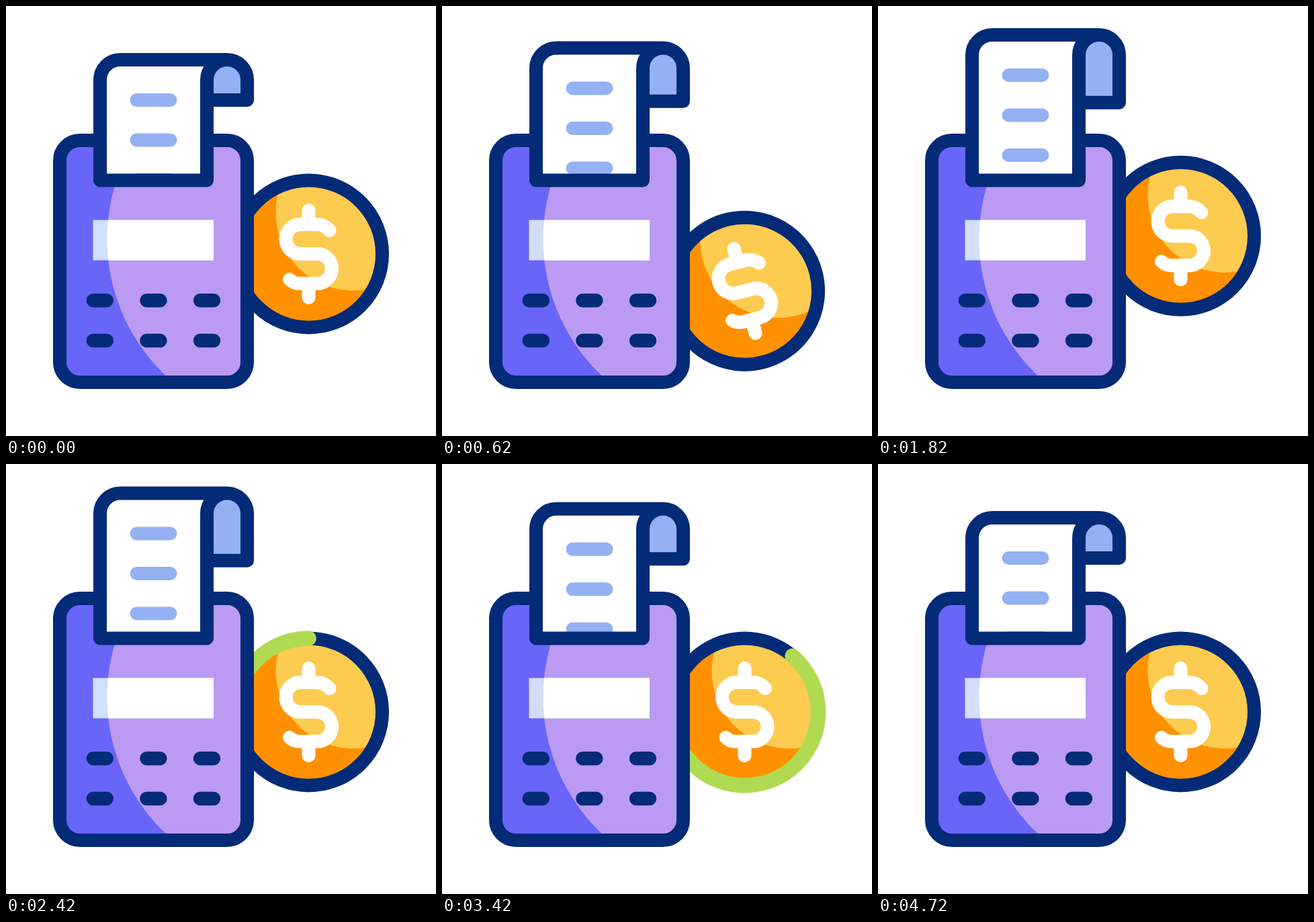
Animation of 640 by 640 pixels, one loop 4.82 s. Source, as an HTML page:

```html
<!DOCTYPE html>
<html lang="en">
<head>
<meta charset="utf-8">
<title>Payment terminal</title>
<style>
  html, body { margin: 0; width: 100%; height: 100%; overflow: hidden; background: #fff; }
  svg { display: block; width: 100vw; height: 100vh; }
  .line { fill: none; stroke-width: 20; stroke-linecap: round; stroke-linejoin: round; }
  .navy { stroke: #032b77; }
  .blue { stroke: #94b1f3; }
  .white { stroke: #fff; }
</style>
</head>
<body>
<svg viewBox="0 0 640 640">
  <defs>
    <clipPath id="lit"><circle cx="430.5" cy="347" r="280"/></clipPath>
    <clipPath id="disc"><circle r="109.5"/></clipPath>
  </defs>

  <g id="coin">
    <circle r="109.5" fill="#ff9100"/>
    <circle cx="66.5" cy="-61" r="115.5" fill="#fdcb50" clip-path="url(#disc)"/>
    <circle class="line navy" r="109.5"/>
    <path id="sweep" class="line" stroke="#b0da52" style="stroke-width:22.5"/>
    <path class="line white" d="M0-65V-44M0 44V65"/>
    <path id="sign" class="line white"
      d="M31-35c-5-6-11-9-19-9H-12a22 22 0 0 0 0 44H12.5a22 22 0 0 1 0 44H-13.5c-6 0-11-2-15-6"/>
  </g>

  <rect x="80" y="200" width="279" height="360" rx="30" fill="#6965f9"/>
  <rect x="80" y="200" width="279" height="360" rx="30" fill="#bb9af3" clip-path="url(#lit)"/>
  <rect x="129.5" y="318.5" width="179.5" height="60" fill="#d2defd"/>
  <rect x="129.5" y="318.5" width="179.5" height="60" fill="#fff" clip-path="url(#lit)"/>
  <rect class="line navy" x="80" y="200" width="279" height="360" rx="30"/>
  <path id="keys" class="line navy" style="stroke-width:20.5"/>
  <path id="flash" class="line" stroke="#fdcb50" style="stroke-width:23"/>

  <path id="sheet" fill="#fff"/>
  <path id="flap" fill="#94b1f3"/>
  <path id="rows" class="line blue" d="M194.5 140h50M194.5 199.5h50M194.5 259h50"/>
  <path id="outline" class="line navy"/>
</svg>
<script>
const LOOP = 4820;
const el = id => document.getElementById(id);
const set = (id, name, value) => el(id).setAttribute(name, value);
const clamp = x => Math.min(1, Math.max(0, x));
const progress = (t, from, to) => clamp((t - from) / (to - from));
const smooth = x => x * x * (3 - 2 * x);

// Eased value through [time, value] stops.
function track(t, stops) {
  let value = stops[0][1];
  for (let i = 1; i < stops.length; i++) {
    const [from, a] = stops[i - 1], [to, b] = stops[i];
    if (t >= from) value = a + (b - a) * smooth(progress(t, from, to));
  }
  return value;
}

function keyPath(tail, head) {
  if (head <= tail) return "";
  let d = "";
  for (const y of [438.3, 498])
    for (const x of [129.8, 209.4, 289])
      d += `M${x + 20 * tail} ${y}H${x + 20 * head}`;
  return d;
}

// Counterclockwise arc measured from the top of the coin.
function arcPath(tail, head) {
  if (head <= tail) return "";
  const r = 109.5;
  const point = u => {
    const a = u * 2 * Math.PI;
    return `${-r * Math.sin(a)} ${-r * Math.cos(a)}`;
  };
  const arc = u => `A${r} ${r} 0 0 0 ${point(u)}`;
  const mid = (tail + head) / 2;
  return `M${point(tail)}${arc(mid)}${arc(head)}`;
}

function drawPaper(t) {
  const rise = track(t, [[0, 0], [520, 17.5], [980, 17.5], [1480, 37], [2290, 37], [4180, 0]]);
  const top = 80 - rise, bend = top + 30, hem = 140 + rise * 0.1;
  const left = `M140 259.5V${bend}a30 30 0 0 1 30-30H329`;
  const curl = `a30 30 0 0 0-30 30`;
  set("sheet", "d", `${left}${curl}V259.5Z`);
  set("flap", "d", `M299 ${hem}V${bend}a30 30 0 0 1 60 0V${hem}Z`);
  set("outline", "d", `${left}${curl}V259.5ZM329 ${top}a30 30 0 0 1 30 30V${hem}H299`);
  set("rows", "transform", `translate(0 ${-rise})`);
}

function drawCoin(t) {
  const shift = track(t, [[0, 0], [550, 60], [1130, -60.5], [2410, 0]]);
  const turn = track(t, [[0, 0], [500, -18], [1100, 18], [1650, 0]]);
  const squeeze = Math.sin(Math.PI * progress(t, 2420, 3620)) ** 2;
  set("coin", "transform", `translate(450.5 ${369 + shift}) rotate(${turn})`);
  set("sign", "transform", `scale(${1 - 0.055 * squeeze} 1)`);
  set("sweep", "d", arcPath(progress(t, 2920, 4610), progress(t, 1920, 3610)));
}

function draw(t) {
  drawPaper(t);
  drawCoin(t);
  set("flash", "d", keyPath(smooth(progress(t, 1200, 1760)), smooth(progress(t, 640, 1080))));
}

// The picture advances in steps of 100 ms; the first one lasts 120 ms.
const step = t => t < 120 ? 0 : 20 + 100 * Math.floor((t - 20) / 100);

set("keys", "d", keyPath(0, 1));
const start = performance.now();
function tick() {
  draw(step((performance.now() - start) % LOOP));
  requestAnimationFrame(tick);
}
tick();
</script>
</body>
</html>
```
